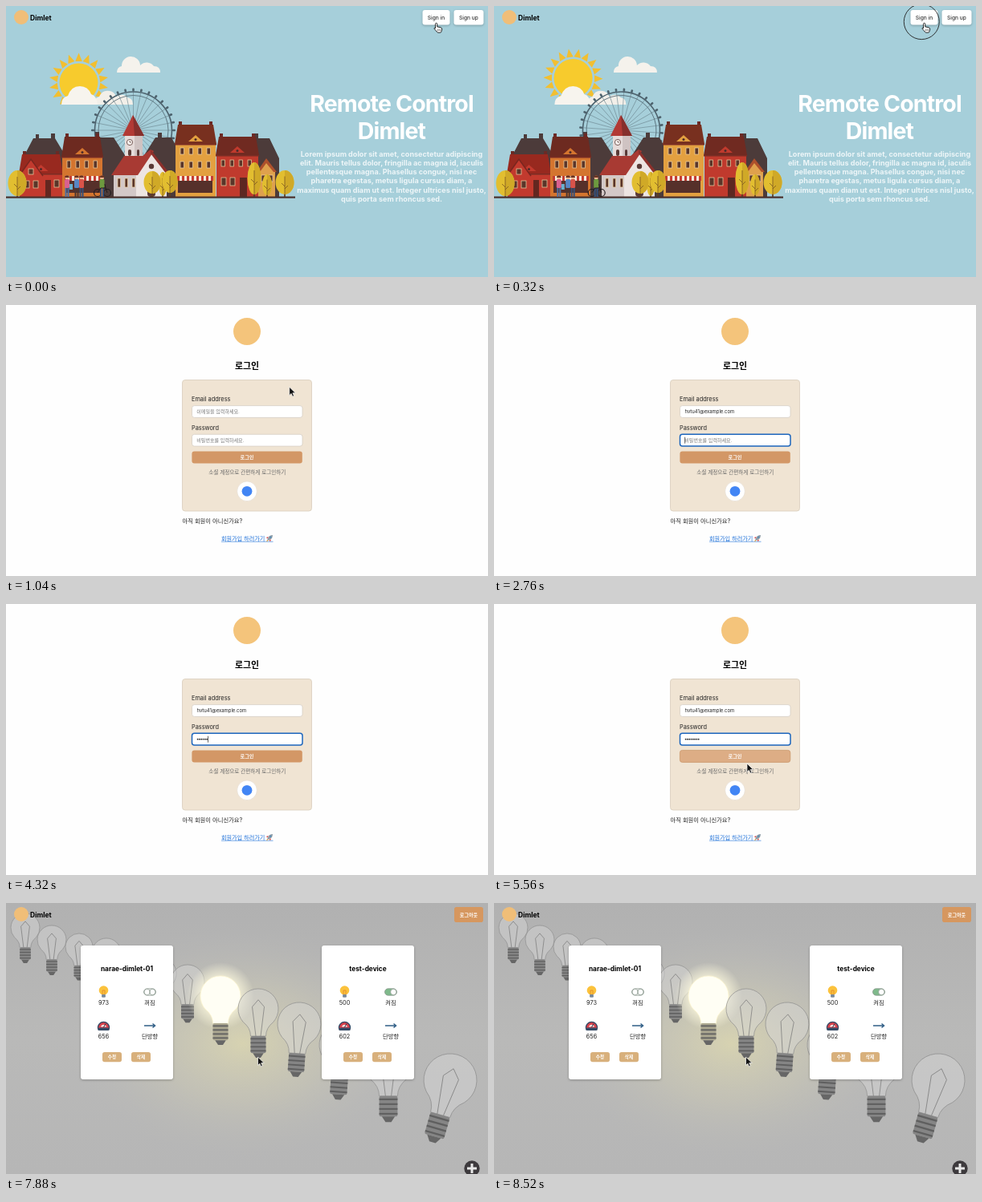
An HTML page for the animation above (8.56 s loop, 600 by 338 pixels).

```html
<!DOCTYPE html>
<html lang="ko">
<head>
<meta charset="utf-8">
<title>Remote Control Dimlet</title>
<style>
html, body { margin: 0; width: 100%; height: 100%; overflow: hidden; }
svg { display: block; width: 100vw; height: 100vh; }
text { font-family: Inter, 'Noto Sans CJK KR', 'Noto Sans CJK', sans-serif; white-space: pre; }
.lift { filter: drop-shadow(0 1px 1.5px rgba(0, 0, 0, .25)); }
</style>
</head>
<body>
<svg id="stage" viewBox="0 0 600 338"></svg>
<script>
const LOOP = 8560, LOGIN = 800, DASH = 7640;
const EMAIL = 'hvtu41@example.com';
const BRAND = 'Dimlet';

const rect = (x, y, w, h, fill, more = '') =>
  `<rect x="${x}" y="${y}" width="${w}" height="${h}" fill="${fill}" ${more}/>`;
const dot = (x, y, r, fill, more = '') =>
  `<circle cx="${x}" cy="${y}" r="${r}" fill="${fill}" ${more}/>`;
const path = (d, fill, more = '') => `<path d="${d}" fill="${fill}" ${more}/>`;
const line = (d, color, width = 1) => path(d, 'none', `stroke="${color}" stroke-width="${width}"`);
const label = (x, y, size, str, more = '') =>
  `<text x="${x}" y="${y}" font-size="${size}" ${more}>${str}</text>`;
const mid = (x, y, size, str, more = '') =>
  label(x, y, size, str, 'text-anchor="middle" ' + more);
const group = (id, body, more = '') => `<g id="${id}" ${more}>${body}</g>`;
const times = (n, f) => Array.from({ length: n }, (_, i) => f(i)).join('');

const header = dot(19, 14, 9, '#f0be78') + label(30, 18, 8.5, BRAND, 'font-weight="700"');

// Landing page

const panes = (x, y, n, gap, w, h) => times(n, i =>
  rect(x + i * gap, y, w, h, '#5a3529', 'stroke="#f0d6a8" stroke-width=".7"'));

function house(x, w, top, eave, wall, roof) {
  const c = x + w / 2;
  return rect(x + 4, top - 4, 4, 8, '#6b2a25') + rect(x + w - 8, top - 4, 4, 8, '#6b2a25') +
    rect(x, eave, w, 238 - eave, wall) +
    path(`M${x - 1} ${eave}L${x + 3} ${top}H${x + w - 3}L${x + w + 1} ${eave}Z`, roof) +
    path(`M${c - 9} ${eave - 3}L${c} ${eave - 11}L${c + 9} ${eave - 3}Z`, wall) +
    dot(c, eave - 5.5, 1.5, '#4b2a2a') +
    rect(x - 1, eave, w + 2, 1.5, '#7a2d24');
}

const awning = (x, n) => times(n, i =>
  rect(x + i * 3, 212, 3, 6, i % 2 ? '#f6ebdd' : '#c43c33')) + rect(x + 1, 218, n * 3 - 2, 15, '#56302a');

const tree = (x, y, rx, ry) =>
  rect(x - .8, y, 1.6, 238 - y, '#5a3a22') +
  `<ellipse cx="${x}" cy="${y}" rx="${rx}" ry="${ry}" fill="#e2be30"/>` +
  path(`M${x} ${y - ry}A${rx} ${ry} 0 0 1 ${x} ${y + ry}Z`, '#d0a927') +
  line(`M${x} ${y - ry / 2}V238M${x} ${y + 5}l-4 -4M${x} ${y + 8}l4 -4`, '#6d4a20', .7);

const person = (x, top, legs) =>
  dot(x, 214, 2.5, '#f0b890') + path(`M${x - 2.8} 214a2.8 2.8 0 0 1 5.6 0Z`, '#6b3423') +
  rect(x - 3, 216, 6, 11, top, 'rx="1.5"') +
  line(`M${x - 1.5} 227V238M${x + 1.5} 227V238`, legs, 2);

const bike = [114, 126].map(x => dot(x, 233, 4.5, 'none', 'stroke="#231d1f" stroke-width="1.2"')).join('') +
  person(119.5, '#6d9a3f', '#35507a') + line('M114 233L118 227H124L126 233M124 227L123 222', '#231d1f');

const rays = times(18, i =>
  path('M-4.3 -26.5L0 -37L4.3 -26.5Z', '#f2bf30', `transform="rotate(${i * 20})"`));

const wheel = times(32, i => `<g transform="rotate(${i * 11.25})">` +
  line('M0 0V-48', '#6d8791', .6) + rect(-1.3, -52.5, 2.6, 4, '#4d626d', 'rx="1"') + '</g>') +
  dot(0, 0, 48, 'none', 'stroke="#4d626d" stroke-width="1.6"') +
  dot(0, 0, 43.5, 'none', 'stroke="#4d626d" stroke-width=".8"') + dot(0, 0, 5, '#4d626d');

const church =
  rect(148, 160, 22, 50, '#e6dcda') + rect(160, 160, 10, 50, '#cfc3c2') +
  path('M145 162L158 136L172 162Z', '#b23a35') + path('M158 136L172 162H160Z', '#86302d') +
  dot(154, 170, 3.6, '#f8f3f0', 'stroke="#5a3a36" stroke-width=".8"') + line('M154 168V170H156', '#5a3a36', .7) +
  rect(152, 179, 4, 8, '#5a3a36', 'rx="2"') + rect(163, 179, 3, 8, '#5a3a36', 'rx="1.5"') +
  rect(134, 209, 30, 29, '#d3c8c7') + panes(139, 215, 3, 9, 3.5, 11) +
  path('M162 238V210L181 181L200 207V238Z', '#ede5e2') +
  path('M131 211L147 187H170L180 179L184 181L164 211Z', '#a83a33') +
  path('M180 179L203 208L200 210L180 184Z', '#8c302b') +
  dot(181, 200, 3.2, '#5a3a36') + rect(176, 216, 10, 22, '#5a3a36', 'rx="4"');

const skyline = 'M22 238V188L34 165H37V160H41V165H56V159H61V165L76 190V238Z' +
  'M98 238V182L108 164H111V157H116V164H134L148 186V238Z' +
  'M172 238V186L186 164H189V158H194V164H206L218 186V238Z' +
  'M262 238V190L286 165H309V159H314V165H328L340 190V238Z';

const town =
  path(skyline, '#4c3b3a') +
  house(17, 53, 185, 209, '#c23a2e', '#98291f') +
  path('M18 211L31 192L45 211V238H18Z', '#c23a2e') + line('M16 212L31 191L46 212', '#7a2720', 1.5) +
  panes(28, 203, 1, 1, 6, 7) + panes(23, 218, 2, 11, 6, 9) + rect(49, 217, 7, 21, '#632720') + panes(60, 217, 1, 1, 6, 9) +
  house(70, 50, 163, 188, '#d4752f', '#6d2a20') + panes(76, 193, 4, 11, 4.5, 9) + awning(73, 15) +
  church +
  house(211, 50, 148, 172, '#e3a040', '#78301f') + panes(217, 177, 4, 11, 4.5, 8) + panes(217, 194, 4, 11, 4.5, 8) + awning(213, 15) +
  house(262, 52, 163, 186, '#c03a2d', '#702a21') + panes(268, 192, 4, 11, 4.5, 8) + panes(268, 214, 2, 11, 6, 10) + rect(291, 214, 9, 24, '#5d2721') +
  rect(314, 205, 21, 33, '#dfa14d') + path('M312 207L324 190L337 207Z', '#ad502c') +
  path('M316 207L324 196L333 207Z', '#dfa14d') + panes(318, 211, 2, 9, 5, 8) +
  tree(14, 221, 11.5, 16) + tree(195, 222, 5, 15) + tree(182, 220, 10.5, 14) + tree(204, 219, 9.5, 14) +
  tree(309, 215, 8.5, 20) + tree(325, 223, 6, 13) + tree(347, 220, 11.5, 15) +
  rect(0, 237.5, 360, 2.2, '#4a302c');

const lorem = ['Lorem ipsum dolor sit amet, consectetur adipiscing',
  'elit. Mauris tellus dolor, fringilla ac magna id, iaculis',
  'pellentesque magna. Phasellus congue, nisi nec',
  'pharetra egestas, metus ligula cursus diam, a',
  'maximus quam diam ut est. Integer ultrices nisl justo,',
  'quis porta sem rhoncus sed.'];

const white = 'fill="#fff" font-weight="700"';
const navButton = (x, w, str) => rect(x, 5, w, 18.5, '#fff', 'rx="3" class="lift"') +
  mid(x + w / 2, 16.8, 6.6, str, 'fill="#333" font-weight="500"');

const home = rect(0, 0, 600, 338, '#a6cfda') +
  `<g clip-path="url(#sky)">${group('sun', group('rays', rays) + dot(0, 0, 24, '#f7cb2d'))}</g>` +
  group('cloudHigh', path('M138 83A8 8 0 0 1 144 75A11.500 11.500 0 0 1 167 74A11 11 0 0 1 184 75Q192 75 192 83Z', '#f5f2ec')) +
  group('cloudLow', path('M108 123Q109 115 116 113Q120 104 129 106Q135 107 137 113Q146 108 151 114Q158 115 158 123Z', '#f2efe9') +
    path('M69 123Q69 114 77 112Q81 100 92 100Q102 100 106 110Q113 112 114 123Z', '#f7f4ee')) +
  group('wheel', wheel) + town +
  group('walkA', person(76, '#d9618f', '#4a6fa5') + rect(79, 222, 4, 7, '#68b0cf')) +
  group('walkB', person(88, '#5886c4', '#493632') + person(94, '#d9534a', '#35507a')) +
  group('bike', bike) + header + navButton(518.5, 34, 'Sign in') + navButton(557.5, 37, 'Sign up') +
  ['Remote Control', BRAND].map((s, i) => mid(480, 131.7 + i * 34, 28.5, s, white + ' letter-spacing="-.85"')).join('') +
  lorem.map((s, i) => mid(480, 187.7 + i * 11.2, 9.08, s, 'fill="#fff" fill-opacity=".8" font-weight="700"')).join('');

// Login page

const field = (id, y) => rect(231.5, y, 137.5, 14.8, '#fff', `id="${id}" rx="3"`);
const rocket = path('M324.5 294.5L327 289Q329 286.8 332 287Q332 290 330 292Z', '#8d9ba6') +
  path('M326.5 289L324 290L325.5 291.5ZM330 292.5L329 295L327.5 293.5Z', '#d83b3b') +
  path('M325.5 293L324 295.3L326.5 294Z', '#f5a623') + dot(329.4, 289.6, .9, '#3b88c3');

const login = rect(0, 0, 600, 338, '#fefefe') +
  dot(300, 33, 17, '#f4c47b') +
  mid(300, 79.7, 10.9, '로그인', 'font-weight="700"') +
  rect(219.5, 93.5, 161, 163.5, '#f0e4d3', 'rx="3.5" stroke="#d9cdbc" stroke-width=".8"') +
  label(231, 119.7, 7.35, 'Email address', 'fill="#222"') + field('emailBox', 125.6) +
  label(231, 155.5, 7.35, 'Password', 'fill="#222"') + field('passBox', 161.3) +
  label(237.3, 135, 6.05, '이메일을 입력하세요.', 'id="emailHint" fill="#777"') +
  label(237.3, 170.8, 6.05, '비밀번호를 입력하세요.', 'id="passHint" fill="#777"') +
  label(237.5, 135, 5.95, '', 'id="email" fill="#222"') +
  group('dots', times(8, i => dot(238.6 + i * 2.3, 168.7, .9, '#222'))) +
  rect(0, 0, .7, 8, '#222', 'id="caret"') +
  rect(231.4, 182.4, 137.4, 15, '#d39766', 'id="submit" rx="3"') +
  mid(300, 192.1, 6.1, '로그인', white) +
  mid(300.3, 210.6, 6.57, '소셜 계정으로 간편하게 로그인하기', 'fill="#666"') +
  dot(300, 232.3, 12.3, '#fff', 'stroke="#e2dbd1" stroke-width=".6"') + dot(300, 232.3, 6.4, '#4285f4') +
  label(219.5, 272, 7.28, '아직 회원이 아니신가요?', 'fill="#222"') +
  label(268, 293.6, 7.1, '회원가입 하러가기', 'fill="#1a6ed8"') + rect(268, 294.8, 64.5, .6, '#1a6ed8') + rocket;

// Dashboard

function bulb([x, y, r, tilt = 0, lit = false]) {
  const glass = lit ? '#fffef4' : '#d9d9d9', edge = lit ? '#fff6cf' : '#8e8e8e';
  const w = .38 * r, b = 1.36 * r;
  return `<g transform="translate(${x} ${y}) rotate(${tilt})">` +
    (lit ? dot(0, 0, 42, 'url(#halo)') : '') +
    path(`M${-w} ${b}Q${-w} ${.95 * r} ${-.75 * r} ${.66 * r}A${r} ${r} 0 1 1 ${.75 * r} ${.66 * r}Q${w} ${.95 * r} ${w} ${b}Z`,
      glass, `fill-opacity="${lit ? 1 : .42}" stroke="${edge}" stroke-width=".7"`) +
    (lit ? '' : line(`M${-.12 * r} ${b}L${-.3 * r} ${-.1 * r}L0 ${-.45 * r}L${.3 * r} ${-.1 * r}L${.12 * r} ${b}`, '#777', .7)) +
    rect(-w, b, 2 * w, .85 * r, lit ? '#a9a58f' : '#858585', 'rx="2"') +
    times(4, i => rect(-w, b + (.1 + i * .2) * r, 2 * w, .07 * r, '#5f5f5f')) +
    path(`M${-.27 * r} ${b + .85 * r}H${.27 * r}L${.12 * r} ${b + 1.08 * r}H${-.12 * r}Z`, '#666') + '</g>';
}

const bulbs = [[24, 31, 18], [57, 46, 18], [91, 55, 17], [125, 62, 18], [160, 75, 19], [192, 88, 20], [226, 98, 21],
  [267, 116, 25, 0, true], [314, 132, 25], [365, 151, 27, 4], [418, 177, 28, 4], [476, 200, 30, 0], [553, 221, 33, 16]];

const chip = (x, y, w, h, str, fill, size) => rect(x, y, w, h, fill, 'rx="2.8"') +
  mid(x + w / 2, y + h / 2 + size * .36, size, str, white);

function card(x, name, power, speed, on) {
  const a = x + 28.5, b = x + 86;
  const rim = 'stroke="#8c9a90" stroke-width=".8"';
  return rect(x, 53, 115, 167, '#fff', 'rx="3" class="lift"') +
    mid(x + 57.5, 85.2, 8.3, name, 'font-weight="700"') +
    dot(a, 109, 5.8, '#fbc23c') + rect(a - 2.4, 114, 4.8, 3.8, '#78889a', 'rx="1"') +
    line(`M${a - 1.5} 114V109H${a + 1.5}V114`, '#e2872d', .8) +
    rect(b - 7.5, 106.8, 15, 8.4, on ? '#7fb98b' : '#fff', 'rx="4.2" ' + rim) +
    dot(b + (on ? 3.3 : -3.3), 111, 3.7, '#fff', rim) +
    (on ? '' : dot(b + 3.3, 111, 3.7, 'none', rim)) +
    path(`M${a - 6.5} 158A7 7 0 1 1 ${a + 6.5} 158Z`, '#d9414b', 'stroke="#344a66" stroke-width="1.3"') +
    path(`M${a - 3.5} 154.5A3.6 3.6 0 0 1 ${a + 3.5} 154.5Z`, '#f5e7e4') +
    line(`M${a} 155L${a + 2.5} 150.5`, '#263950') + rect(a - 6.5, 155.5, 13, 3.5, '#344a66', 'rx="1"') +
    line(`M${b - 7} 153H${b + 6}M${b + 3.5} 150.5L${b + 6.5} 153L${b + 3.5} 155.5`, '#315f87', 1.5) +
    mid(a, 127.4, 7.3, power, 'fill="#222"') + mid(b, 127, 7.3, on ? '켜짐' : '꺼짐', 'fill="#222"') +
    mid(a, 169.4, 7.3, speed, 'fill="#222"') + mid(b, 169, 7.3, '단방향', 'fill="#222"') +
    chip(x + 27, 186, 24, 12.3, '수정', '#d8b07c', 5.6) + chip(x + 63, 186, 24, 12.3, '삭제', '#d8b07c', 5.6);
}

const dash = rect(0, 0, 600, 338, 'url(#wall)') + rect(80, 30, 430, 290, 'url(#glow)') +
  bulbs.map(bulb).join('') + header + chip(558, 5, 36, 19, '로그아웃', '#d6975f', 6.1) +
  card(93, 'narae-dimlet-01', 973, 656, false) + card(393, 'test-device', 500, 602, true) +
  dot(580, 331, 9.7, '#3d3a3d') + line('M580 325V337M574 331H586', '#e8e8e8', 3);

const defs = `<defs>
<clipPath id="sky"><rect width="360" height="122.5"/></clipPath>
<linearGradient id="wall" x2="0" y2="1"><stop stop-color="#b1b1b1"/><stop offset=".5" stop-color="#b9b9b8"/><stop offset="1" stop-color="#b6b6b6"/></linearGradient>
<radialGradient id="glow"><stop stop-color="#dcd7b0" stop-opacity=".85"/><stop offset=".5" stop-color="#ccc9b4" stop-opacity=".5"/><stop offset="1" stop-color="#b9b9b8" stop-opacity="0"/></radialGradient>
<radialGradient id="halo"><stop offset=".5" stop-color="#fffbe0" stop-opacity=".8"/><stop offset="1" stop-color="#fffbe0" stop-opacity="0"/></radialGradient>
</defs>`;

const ink = 'stroke-linejoin="round" stroke';
const cursor =
  group('arrow', path('M0 0V10.5L2.4 8.3L4 12L5.8 11.2L4.2 7.6H7.6Z', '#111', ink + '="#fff" stroke-width=".7"')) +
  group('hand', path('M2.2 1.2a1.1 1.1 0 0 1 2.2 0V4.6l4.6 1.1q1.6.5 1.4 2.2l-.6 2.2q-.2 1.6-1.2 1.8H5.2q-1.2-.6-2-2.2L.6 7.2q-.4-1.4 1.6-.6Z',
    '#fff', ink + '="#111" stroke-width=".9"') + line('M5 7.5V10M6.7 7.5V10M8.4 7.5V10', '#111', .5), 'transform="translate(-3.3 -1)"') +
  group('beam', line('M-1.5 -5H1.5M0 -5V5M-1.5 5H1.5', '#222', .8));

stage.innerHTML = defs + group('home', home) + group('login', login) + group('dash', dash) +
  group('cursor', dot(-3.3, -2.6, 22, 'none', 'id="ring" stroke="#222" stroke-width=".9"') + cursor);

// Animation

const el = id => document.getElementById(id);
const show = (id, on) => el(id).style.display = on ? '' : 'none';
const move = (id, x, y = 0, turn = 0) => el(id).setAttribute('transform', `translate(${x} ${y}) rotate(${turn})`);
const clamp = (v, lo, hi) => Math.max(lo, Math.min(hi, v));
const within = (t, a, b) => t >= a && t < b;

const track = [[0, 535.6, 22.2], [920, 535.6, 22.2], [1040, 353, 102], [1400, 300, 133], [5000, 300, 133],
  [5360, 313, 194], [5560, 315, 199], [5800, 314.5, 195], [7640, 314.5, 195], [7720, 313.5, 192], [LOOP, 313.5, 192]];

function pointer(t) {
  const i = track.findIndex(k => k[0] > t);
  const [t0, x0, y0] = track[i - 1], [t1, x1, y1] = track[i];
  const p = (t - t0) / (t1 - t0), e = 1 - (1 - p) ** 2;
  return [x0 + (x1 - x0) * e, y0 + (y1 - y0) * e];
}

function outline(id, focused) {
  el(id).setAttribute('stroke', focused ? '#1d66bd' : '#d6cfc5');
  el(id).setAttribute('stroke-width', focused ? 1.5 : .8);
}

function drawHome(t) {
  const s = t / 1000;
  move('sun', 90.5 + 25 * s, 95.5 - 17 * s);
  move('rays', 0, 0, 35 * s);
  move('cloudHigh', 34 * s);
  move('cloudLow', 20 * s);
  move('wheel', 158.5, 155, 12 * s);
  move('walkA', 15 * s);
  move('walkB', 13 * s);
  move('bike', 24 * s);
}

function drawLogin(t) {
  const typed = clamp(Math.floor((t - 1880) / 480 * EMAIL.length), 0, EMAIL.length);
  const secret = clamp(Math.floor((t - 3320) / 200) + 1, 0, 8);
  const onEmail = within(t, 1480, 2520), onPass = within(t, 2520, 5880);
  el('email').textContent = EMAIL.slice(0, typed);
  [...el('dots').children].forEach((d, i) => d.style.display = i < secret ? '' : 'none');
  show('emailHint', !typed);
  show('passHint', !secret);
  outline('emailBox', onEmail);
  outline('passBox', onPass);

  show('caret', onEmail || within(t, 2520, 3080) || within(t, 3320, 4800));
  const x = onEmail ? 237.5 + (typed && el('email').getComputedTextLength()) : 237.4 + secret * 2.3;
  move('caret', x, onEmail ? 129 : 164.7);

  const hover = clamp((t - 5240) / 150, 0, 1);
  const mix = (a, b) => Math.round(a + (b - a) * hover);
  el('submit').setAttribute('fill', `rgb(${mix(211, 221)},${mix(151, 173)},${mix(102, 133)})`);
  el('submit').setAttribute('stroke', hover ? '#cc986c' : 'none');
  el('submit').setAttribute('stroke-width', .8);
}

function frame(now) {
  const t = now % LOOP;
  show('home', t < LOGIN);
  show('login', within(t, LOGIN, DASH));
  show('dash', t >= DASH);
  if (t < LOGIN) drawHome(t);
  else if (t < DASH) drawLogin(t);

  const hand = t < 930 || within(t, 5620, DASH), beam = within(t, 1300, 1880) || within(t, 5000, 5100);
  show('cursor', !within(t, 1880, 5000));
  show('hand', hand);
  show('beam', beam);
  show('arrow', !hand && !beam);
  show('ring', within(t, 240, 520) || within(t, 1480, 1680) || within(t, 5880, 6120));
  move('cursor', ...pointer(t));
  requestAnimationFrame(frame);
}
frame(0);
</script>
</body>
</html>
```
